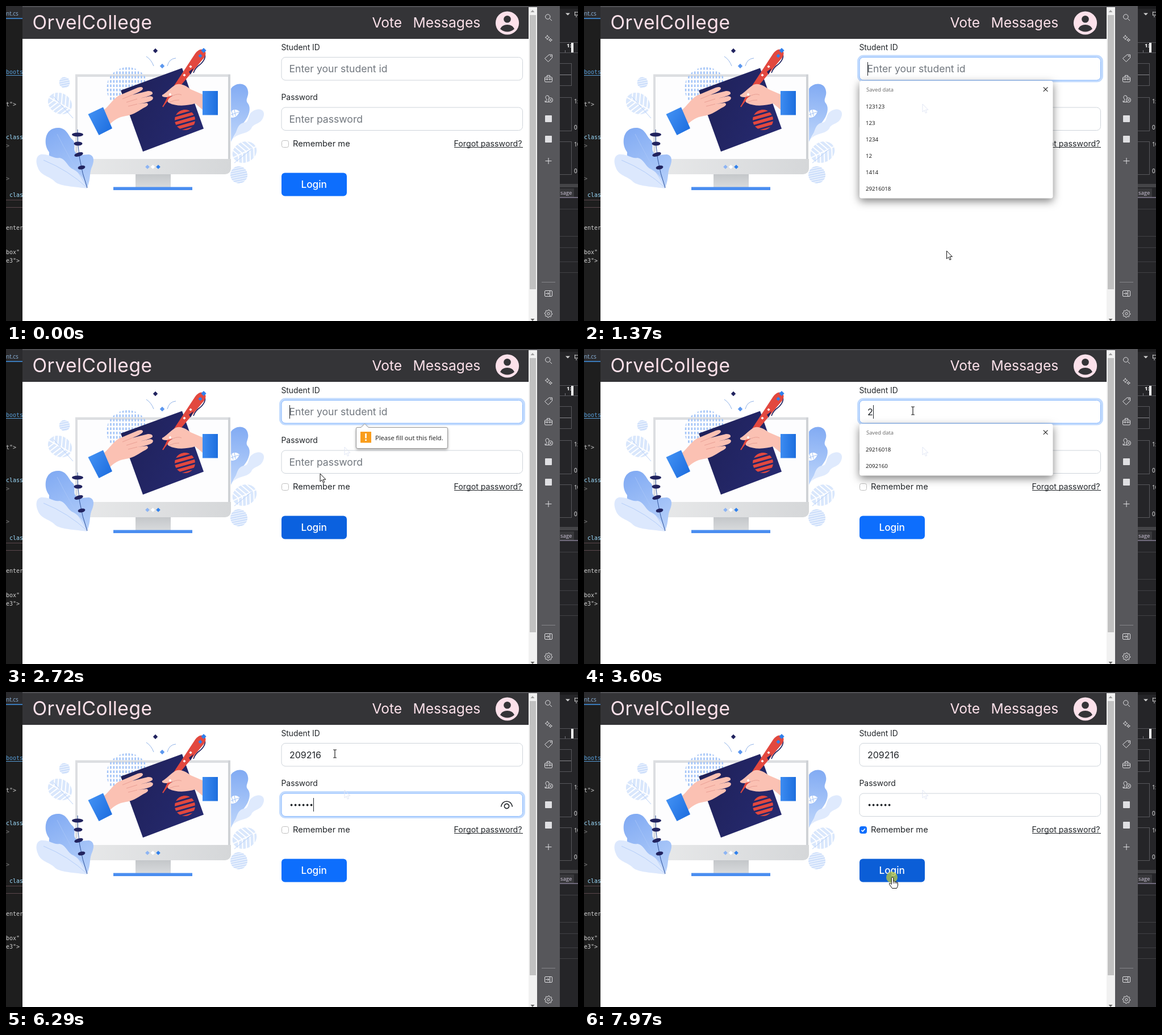
These frames come from a looping animation (1007x556 px, 8000 ms). An HTML page with a canvas:

```html
<!DOCTYPE html>
<html lang="en">
<head>
<meta charset="utf-8">
<title>Login</title>
<style>
html, body { margin: 0; width: 100%; height: 100%; overflow: hidden; background: #1e1e1e; }
canvas { display: block; }
</style>
</head>
<body>
<canvas id="stage" width="1007" height="556"></canvas>
<script>
const LOOP = 8000;
const UI = 'Inter, "Open Sans", sans-serif';
const SYS = '"Open Sans", "Noto Sans", sans-serif';
const MONO = '"DejaVu Sans Mono", "Noto Sans Mono", monospace';
const NAVY = '#21235f', BLUE = '#2f80ec', RED = '#e2483f', SKIN = '#fbc1b3';

const stage = document.getElementById('stage').getContext('2d');
let g = stage;

function rect(x, y, w, h, color) {
  g.fillStyle = color;
  g.fillRect(x, y, w, h);
}
function round(x, y, w, h, r, fill, line, width = 1) {
  g.beginPath();
  g.roundRect(x, y, w, h, r);
  if (fill) { g.fillStyle = fill; g.fill(); }
  if (line) { g.strokeStyle = line; g.lineWidth = width; g.stroke(); }
}
function shape(d, fill, line, width = 1) {
  const p = new Path2D(d);
  if (fill) { g.fillStyle = fill; g.fill(p); }
  if (line) { g.strokeStyle = line; g.lineWidth = width; g.stroke(p); }
}
function oval(x, y, rx, ry, fill, rot = 0) {
  g.beginPath();
  g.ellipse(x, y, rx, ry, rot, 0, Math.PI * 2);
  g.fillStyle = fill;
  g.fill();
}
function text(s, x, y, size, color, family = UI, weight = 400) {
  g.font = `${weight} ${size}px ${family}`;
  g.fillStyle = color;
  g.fillText(s, x, y);
}
function diamond(x, y, r, color) {
  shape(`M${x} ${y - r}L${x + r} ${y}L${x} ${y + r}L${x - r} ${y}Z`, color);
}
function fade(x0, y0, x1, y1, a, b) {
  const f = g.createLinearGradient(x0, y0, x1, y1);
  f.addColorStop(0, a);
  f.addColorStop(1, b);
  return f;
}
function clipOval(x, y, r, rot, draw) {
  g.save();
  g.beginPath();
  g.arc(x, y, r, 0, Math.PI * 2);
  g.clip();
  g.translate(x, y);
  g.rotate(rot);
  draw();
  g.restore();
}
function withShadow(blur, dy, color, draw) {
  g.save();
  g.shadowColor = color;
  g.shadowBlur = blur;
  g.shadowOffsetY = dy;
  draw();
  g.restore();
}

/* ---------- fixed scenery ---------- */

function editor() {
  rect(0, 0, 30, 556, '#1e1e1e');
  rect(0, 0, 30, 22, '#2b2b2e');
  rect(0, 21, 30, 2, '#3a79b8');
  text('nt.cs', 0, 17, 10, '#8cb4da', SYS);
  const lines = [
    ['boots', 120, '#569cd6'], ['t">', 177, '#c8c8c8'], ['class=', 235, '#9cdcfe'],
    ['>', 250, '#808080'], ['>', 308, '#808080'], [' clas', 337, '#9cdcfe'],
    ['enter', 395, '#d0d0d0'], ['box"', 438, '#d0d0d0'], ['e3">', 453, '#d0d0d0']
  ];
  for (const [s, y, c] of lines) text(s, 0, y, 10, c, MONO);
  rect(0, 122, 29, 1, '#569cd6');
  rect(0, 342, 29, 1, '#5a474c');
  rect(0, 355, 29, 1, '#5a474c');
}

function debuggerPane() {
  rect(975, 0, 32, 556, '#252528');
  rect(975, 0, 32, 5, '#1b1b1d');
  shape('M985 12.5H993L989 16.5Z', '#d0d0d0');
  shape('M1001.5 10V17M1001 11H1007M1001 16H1007M1004 17V20', null, '#d0d0d0');
  rect(975, 64, 32, 1, '#55555a');
  rect(975, 82, 32, 1, '#55555a');
  rect(984, 78, 1, 4, '#77777c');
  rect(995, 65, 4, 17, '#fff');
  for (const [y, h] of [[101, 39], [161, 59], [239, 58]]) {
    rect(975, y, 21, 1, '#58585c');
    rect(975, y + h, 21, 1, '#58585c');
    rect(995, y, 1, h, '#58585c');
  }
  rect(975, 121, 20, 1, '#88888c');
  text('1:', 1000, 172, 10, '#eee', SYS);
  text('0', 1000, 218, 10, '#eee', SYS);
  text('10', 1000, 248, 10, '#eee', SYS);
  text('0', 1000, 295, 10, '#eee', SYS);
  rect(975, 314, 32, 6, '#454548');
  rect(975, 322, 25, 16, '#38383b');
  text('sage', 976, 333, 9.5, '#d0c8dc', SYS);
  rect(975, 337, 32, 2, '#706a7c');
  for (const y of [358, 406, 426, 451, 470]) rect(975, y, 32, 1, '#414145');
}

function sidebar() {
  const ink = '#e0e0e3';
  rect(935, 0, 40, 556, '#57575b');
  shape('M957.5 22.5L961 26M958 19A4.2 4.2 0 1 1 949.6 19A4.2 4.2 0 1 1 958 19Z', null, ink);
  shape('M953 51.5Q953.4 55 957 55.5Q953.4 56 953 59.5Q952.6 56 949 55.5Q952.6 55 953 51.5ZM958.5 57L959.3 59.2L961.5 60L959.3 60.8L958.5 63L957.7 60.8L955.5 60L957.7 59.2Z', null, ink, .9);
  shape('M956 86H961.5V91.5L954.5 98.5L948.5 92.5Z', null, ink);
  oval(959, 88.5, 1, 1, ink);
  round(948.5, 125.5, 13, 8.5, 1.5, null, ink);
  shape('M952.5 125V122.5H957.5V125M948.5 129H961.5M952.5 127.5V131M957.5 127.5V131', null, ink);
  shape('M949 169.5H956M950.5 169Q953 164 950 162.5Q949.5 158 953 158Q956.5 158 956 162M949 169.5V167', null, ink);
  shape('M962.5 166A4 4 0 1 1 954.5 166A4 4 0 1 1 962.5 166ZM956.5 164L960.5 168M960.5 164L956.5 168', null, ink);
  round(949, 193, 12, 12, 1, ink);
  round(949, 229, 12, 12, 1, ink);
  shape('M949.5 273.5H960.5M955 268V279', null, ink);
  rect(943, 487, 24, 1, '#85858a');
  round(948.5, 502.5, 13, 10, 1.5, null, ink);
  shape('M957.5 502.5V512.5M950 507.5H956M953.5 505L956 507.5L953.5 510', null, ink);
  g.save();
  g.translate(955, 543);
  g.beginPath();
  for (let i = 0; i < 32; i++) {
    const r = i % 4 < 2 ? 6.8 : 5.2, a = i / 32 * Math.PI * 2;
    g.lineTo(r * Math.cos(a), r * Math.sin(a));
  }
  g.closePath();
  g.strokeStyle = ink;
  g.lineWidth = 1;
  g.stroke();
  g.beginPath();
  g.arc(0, 0, 2.2, 0, 7);
  g.stroke();
  g.restore();
}

function scrollbar() {
  rect(920, 2, 15, 554, '#f1f1f1');
  rect(922, 16, 11, 484, '#c1c1c1');
  shape('M923.5 11L927 7L930.5 11Z', '#a0a0a0');
  shape('M923.5 552L927 556L930.5 552Z', '#606060');
}

function navbar() {
  const pink = '#fce1ea', dark = '#343437';
  rect(29, 0, 906, 2, '#515155');
  rect(29, 2, 891, 56, dark);
  g.letterSpacing = '0.5px';
  text('OrvelCollege', 46.5, 41, 33.5, pink);
  g.letterSpacing = '0px';
  text('Vote', 644.5, 38, 24.6, pink);
  text('Messages', 716.5, 38, 24.6, pink);
  oval(882.5, 30, 20.6, 20.6, pink);
  oval(882.5, 23.3, 6.3, 6.3, dark);
  shape('M870 40.5Q873 33 882.5 33Q892 33 895 40.5Q889 45.5 882.5 45.5Q876 45.5 870 40.5Z', dark);
}

function stripedLeaf(x, y, rx, ry, rot) {
  oval(x, y, rx, ry, '#d9e7fc', rot);
  g.save();
  g.translate(x, y);
  g.rotate(rot);
  g.strokeStyle = '#fff';
  g.lineWidth = 2;
  g.beginPath();
  for (let i = -2; i < 3; i++) {
    const k = i * rx * .34;
    g.moveTo(k - 5, -ry);
    g.lineTo(k + 3, 0);
    g.lineTo(k - 5, ry);
  }
  g.moveTo(-rx, 0);
  g.lineTo(rx, 0);
  g.stroke();
  g.restore();
}

function hatchedDot(x, y, r) {
  clipOval(x, y, r, -.2, () => {
    rect(-r, -r, 2 * r, 2 * r, '#e6effd');
    for (let k = -r; k < r; k += 4) rect(-r, k, 2 * r, 1.4, '#c3d8fa');
  });
}

function plants() {
  hatchedDot(103, 135, 9.5);
  stripedLeaf(95, 172, 22, 18, .5);
  shape('M84 160L118 198', null, '#b8d0f8', 1);
  shape('M396 146C404 134 424 134 426 150C428 160 420 165 426 172C432 180 428 194 420 204C410 216 402 226 396 240Z',
    fade(410, 138, 400, 230, '#82abf3', '#b9d2fa'));
  shape('M396 238C408 226 404 210 418 206C430 206 424 192 434 186C446 178 458 184 453 196C448 210 436 206 432 216C424 228 408 222 396 238Z', '#dfeafd');
  shape('M394 190Q400 178 411 186Q406 200 394 196Z', '#fff');
  shape('M397 185L400 195M402 182L404 194M396 192L410 187', null, '#9fc0f6');
  stripedLeaf(420, 258, 22, 18, -.45);
  shape('M402 277L434 251', null, '#b8d0f8', 1);
  hatchedDot(410, 298, 15);
}

function monitor() {
  rect(122, 120.5, 273, 155, '#dcdee1');
  rect(126, 125, 265, 146, '#fdfdfe');
  rect(391, 121, 4, 150, '#cfd2d6');
  rect(228, 297, 62, 23, fade(0, 297, 0, 320, '#c4c7ca', '#d8dadc'));
  round(122, 270, 274, 27, [0, 0, 10, 10], fade(122, 0, 396, 0, '#e8e9ea', '#d5d7d9'));
  diamond(249, 284, 3.8, '#8db4f3');
  diamond(258.5, 284, 3.8, '#fff');
  diamond(268, 284, 3.8, BLUE);
  rect(189, 319.5, 139, 5.5, '#4a8df0');
}

function artwork() {
  clipOval(214, 145, 37, 0, () => {
    g.strokeStyle = '#a3c4f7';
    g.lineWidth = 2.6;
    g.setLineDash([4.6, 3]);
    g.beginPath();
    for (let x = -35; x < 38; x += 5.4) {
      g.moveTo(x, -37);
      g.lineTo(x, 37);
    }
    g.stroke();
  });
  shape('M202 149L310 109.5L348 216.5L241 257Z', fade(202, 150, 348, 216, '#1f2159', '#262a70'));
  clipOval(315, 201, 18, -.28, () => {
    for (let y = -18; y < 18; y += 8.4) rect(-20, y, 40, 5.4, RED);
  });

  diamond(263, 79, 4.2, NAVY);
  diamond(275, 106, 4.2, '#5b97ef');
  shape('M247 89Q256 95 260 106M284 106Q287 93 299 92', null, '#8fb2e8', 1);

  shape('M172 184C182 176 187 165 199 158L232 144Q241 141 241 146Q240 150 222 157L250 150Q259 150 258 155Q255 159 231 164L254 159Q261 160 258 165Q253 170 231 173L248 171Q253 174 246 178C234 184 226 192 211 194C198 196 191 201 182 209Z', SKIN);
  shape('M222 157L205 164M231 164L212 170M231 173L215 177', null, '#e79c91', .9);
  shape('M144.5 191L171 178.5L187 216L163.5 228Z', fade(145, 190, 187, 215, '#4190f3', '#1f6fe0'));

  shape('M349 82Q354 92 342 103Q333 109 330 118', null, NAVY, 1.6);
  shape('M276 178L287 154L333 84Q341 73 349 78Q354 83 349 91L302 147Z', RED);
  diamond(342, 88, 3.6, BLUE);
  diamond(348, 78.5, 4.6, BLUE);
  diamond(325, 107, 2.6, '#fff');
  diamond(314, 122, 2.6, '#fff');
  shape('M322 116L330 110L325 121Z', NAVY);
  shape('M346 156L325 147C315 139 304 135 297 140C288 146 281 154 275 157Q273 161 283 161L294 158C285 163 282 169 287 171C300 178 320 176 333 172L346 183Z', SKIN);
  shape('M294 158Q304 154 309 157M288 170Q297 165 305 166', null, '#e79c91', .9);
  shape('M276 178L287 160', null, RED, 2);
  diamond(289, 156, 2.4, '#fff');
  rect(346, 150, 27, 42.5, fade(346, 0, 373, 0, '#3d8cf1', '#1d6ede'));
}

function frontPlant() {
  shape('M143 320C116 302 72 288 76 258C70 250 69 242 70 234C72 220 82 214 94 215C108 217 110 230 117 236C124 242 118 252 122 258C128 266 136 262 146 262C156 264 155 274 152 282C146 294 150 304 143 320Z',
    fade(85, 215, 143, 320, '#82abf3', '#b6d0fa'));
  shape('M143 322C112 318 92 318 84 308C74 300 60 298 56 285C50 270 56 260 66 262C78 262 84 270 94 268C106 270 108 284 118 288C132 296 138 306 143 322Z', '#dce8fd');
  shape('M66 272Q110 290 143 321M90 226Q112 270 143 320', null, '#a9c6f8', .8);
  shape('M126 218Q125 270 143 321', null, '#31549c', 1);
  for (const [x, y, rx, a] of [[126, 227, 10, 0], [127, 243, 7.5, 0], [128, 262, 8, -.3], [133, 285, 6.5, -.2]])
    oval(x, y, rx, 3.4, NAVY, a);
}

function formLabels() {
  const ink = '#212529';
  text('Student ID', 484.5, 77.5, 13.8, ink);
  text('Password', 484.5, 166, 13.9, ink);
  text('Remember me', 505, 248, 14.7, ink);
  text('Forgot password?', 788.5, 248, 14.2, ink);
  rect(789, 249, 121, 1, ink);
}

function makeScene() {
  const c = document.createElement('canvas');
  c.width = 1007;
  c.height = 556;
  g = c.getContext('2d');
  editor();
  debuggerPane();
  sidebar();
  rect(29, 58, 891, 498, '#fff');
  navbar();
  scrollbar();
  plants();
  monitor();
  artwork();
  frontPlant();
  formLabels();
  g = stage;
  return c;
}

/* ---------- moving parts ---------- */

// time, x, y of the pointer tip
const PATH = [
  [70, 948, 528], [560, 552, 20], [760, 552, 20], [980, 590, 108], [1060, 590, 108],
  [1150, 595, 173], [1370, 638.5, 432], [1500, 641, 456], [1590, 641, 456], [1700, 541, 298],
  [2320, 543, 306], [2560, 545, 306], [2720, 553, 220.5], [2950, 570, 118], [3180, 579, 109],
  [6820, 579, 109], [6950, 563, 255], [7290, 563, 255], [7460, 491, 243], [7580, 491, 243],
  [7860, 543, 327], [8000, 543, 327]
];
const CLICKS = [1000, 1570, 2390, 7490, 7930];
const ID_KEYS = [3600, 3940, 4140, 4390, 4590, 4790];
const PASS_KEYS = [5540, 5680, 5810, 5940, 6080, 6290];
const SAVED = ['123123', '123', '1234', '12', '1414', '29216018'];

const between = (t, a, b) => t >= a && t < b;
const clamp = v => Math.max(0, Math.min(1, v));
const count = (keys, t) => keys.filter(k => t >= k).length;

function pointerAt(t) {
  const i = PATH.findIndex(p => p[0] > t);
  if (i < 1) return null;
  const [t0, x0, y0] = PATH[i - 1], [t1, x1, y1] = PATH[i];
  const k = (t - t0) / (t1 - t0);
  return [x0 + (x1 - x0) * k, y0 + (y1 - y0) * k];
}

function field(y, focused) {
  if (focused) round(483, y - 1.5, 429, 44, 9, null, '#c2dbfe', 4);
  round(485, y + .5, 424.5, 40.5, 7, '#fff', focused ? '#86b7fe' : '#ced4da');
}

function caret(x, y) {
  rect(Math.round(x), y, 1, 24, '#212529');
}

function savedList(items) {
  const h = 33.5 + 29 * items.length;
  withShadow(15, 5, 'rgba(0,0,0,.5)', () => round(485, 132, 340.5, h, 4, '#fff'));
  text('Saved data', 497, 151, 9.4, '#666', SYS);
  shape('M808.8 143.3L816.4 150.9M816.4 143.3L808.8 150.9', null, '#222', 1.1);
  items.forEach((s, i) => text(s, 496, 180.5 + 29 * i, 9.7, '#111', SYS));
}

function tooltip(alpha) {
  g.save();
  g.globalAlpha = alpha;
  const d = 'M618 138.5H625L631.5 132L638 138.5H775Q777.5 138.5 777.5 141V173Q777.5 175.5 775 175.5H619Q616.5 175.5 616.5 173V141Q616.5 138.5 618 138.5Z';
  withShadow(5, 2, 'rgba(0,0,0,.4)', () => shape(d, '#fff'));
  shape(d, null, '#999');
  rect(624, 146, 19, 19.5, '#f99d1c');
  rect(632.2, 149, 2.6, 8.5, '#fff');
  rect(632.2, 159.5, 2.6, 2.6, '#fff');
  text('Please fill out this field.', 650, 160.5, 11.2, '#1c1c1c', SYS);
  g.restore();
}

function loginButton(t) {
  const dark = t < 5000
    ? clamp((t - 1710) / 150) - clamp((t - 2690) / 150)
    : clamp((t - 7790) / 130);
  const mix = (a, b) => Math.round(a + (b - a) * dark);
  round(485, 294.5, 115, 41, 6, `rgb(${mix(13, 11)},${mix(110, 94)},${mix(253, 215)})`);
  text('Login', 519.5, 321, 17.2, '#fff', UI, 500);
}

function checkbox(t) {
  const on = t >= 7500;
  if (between(t, 7490, 7930)) round(483.5, 235.5, 16, 16, 5, null, '#c2dbfe', 4);
  round(485.5, 237.5, 12, 12, 3, on ? '#0d6efd' : '#fff', on ? '#0d6efd' : '#bfbfbf');
  if (on) shape('M488.5 243.8L490.7 246L494.8 241.2', null, '#fff', 1.7);
}

function eye() {
  shape('M871.5 202.5Q873.5 193 881.5 193Q889.5 193 891.5 202.5M885.6 201.5A4.1 4.1 0 1 1 877.4 201.5A4.1 4.1 0 1 1 885.6 201.5Z', null, '#212529', 1.6);
}

const ARROW = 'M0 0V14L3.2 11L5.4 16L7.6 15L5.4 10.2H9.8Z';
const HAND = 'M-1.7 1.6Q-1.7 0 0 0Q1.7 0 1.7 1.6V7Q4 6 4.5 8Q6.8 7 7.2 9Q9.5 8.4 9.5 11V14Q9 17 7.5 19.5H-.5Q-3 16 -5.4 12.4Q-6 10 -3.8 10.4L-1.7 12.5Z';
const IBEAM = 'M-3 -7H-1Q0 -7 0 -6Q0 -7 1 -7H3M0 -6V6M-3 7H-1Q0 7 0 6Q0 7 1 7H3';

function pointer(t, listed) {
  const p = pointerAt(t);
  if (!p) return;
  const [x, y] = p;
  const inX = x > 485 && x < 910;
  const overText = inX && (between(y, 91, 131) || (between(y, 179, 220) && !listed));
  const overButton = between(x, 485, 600) && between(y, 294, 336);
  if (CLICKS.some(c => between(t, c, c + 110))) oval(x - 1, y, 10, 10, 'rgba(190,200,60,.75)');
  g.save();
  g.translate(x, y);
  if (overText) shape(IBEAM, null, '#222', 1.2);
  else shape(overButton ? HAND : ARROW, '#fff', '#111', 1);
  if (overButton) shape('M1.7 7V11M4.5 8V11M7.2 9V11.5', null, '#111', .9);
  g.restore();
}

function charts(t) {
  if (t < 5540) text('1:', 987, 73, 9.5, '#fff', SYS, 700);
  if (!between(t, 3940, 5540)) return;
  const w = 2 + (t - 3940) / 95.5;
  rect(976, 167, w, 53, '#4f7f95');
  rect(976, 167, w, 1, '#86b4c8');
  rect(976, 295, w, 1, '#86a0ac');
}

function draw(t) {
  g.drawImage(scene, 0, 0);
  charts(t);

  const idFocus = between(t, 1000, 1580) || between(t, 2430, 5300);
  const passFocus = between(t, 5300, 7490);
  const typed = '209216'.slice(0, count(ID_KEYS, t));
  const dots = count(PASS_KEYS, t);

  field(90, idFocus);
  if (typed) text(typed, 499, 116.5, 16, '#212529');
  else text('Enter your student id', 498.5, 117, 17.6, '#72787f');
  if (idFocus && !between(t, 3210, 3600)) caret(typed ? 499.5 + g.measureText(typed).width : 499, 99);

  field(178.5, passFocus);
  if (!dots) text('Enter password', 498.5, 205.5, 17.6, '#72787f');
  for (let i = 0; i < dots; i++) oval(502.6 + 7 * i, 199.5, 1.9, 1.9, '#212529');
  if (passFocus && !between(t, 6820, 7350)) caret(499 + 7 * dots, 187);
  if (passFocus && dots) eye();

  checkbox(t);
  loginButton(t);

  let items = null;
  if (between(t, 1080, 1580)) items = SAVED;
  else if (between(t, 3600, 3940)) items = ['29216018', '2092160'];
  else if (between(t, 3940, 5300)) items = ['2092160'];
  if (items) savedList(items);
  if (between(t, 2480, 3340)) tooltip(clamp((t - 2440) / 120) * clamp((3350 - t) / 140));

  // faint trace the pointer leaves behind
  if (t >= 1180) {
    g.save();
    g.translate(596, 173);
    shape(ARROW, null, '#e1e6f5', 1);
    g.restore();
  }
  pointer(t, items);
}

const scene = makeScene();
function tick() {
  draw(performance.now() % LOOP);
  requestAnimationFrame(tick);
}
tick();
</script>
</body>
</html>
```
